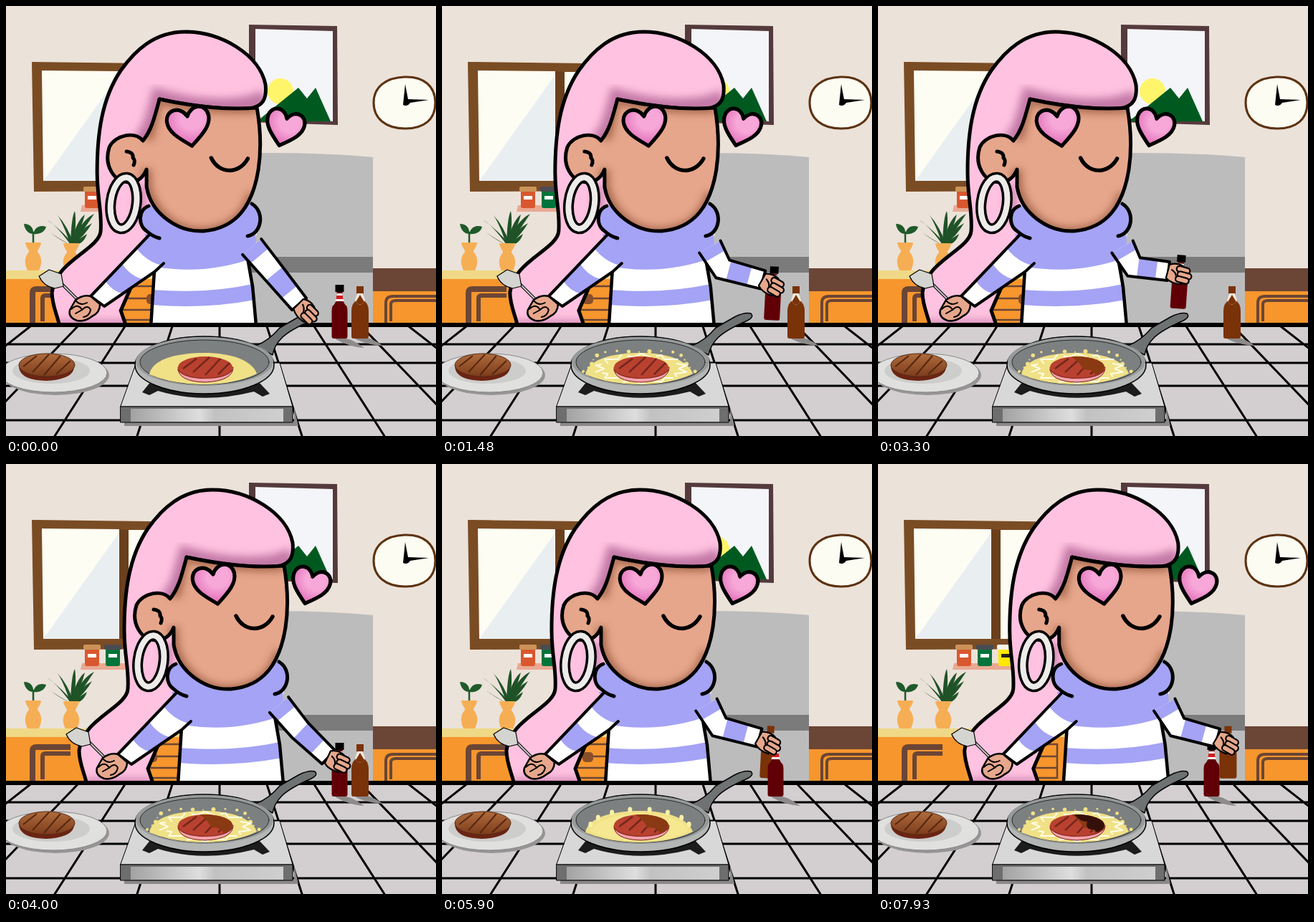
An HTML page that plays this animation: 600x600 px, repeating every 8000 ms.

```html
<!DOCTYPE html>
<html lang="en">
<head>
<meta charset="utf-8">
<title>Cooking</title>
<style>
html,body{margin:0;width:100%;height:100%;overflow:hidden;background:#ebe2d9}
svg{display:block;width:100vw;height:100vh}
.o{stroke:#000;stroke-linejoin:round;stroke-linecap:round}
.l{fill:none;stroke:#000;stroke-linejoin:round;stroke-linecap:round}
</style>
</head>
<body>
<svg viewBox="0 0 600 600">
<defs>
  <filter id="soft" x="-30%" y="-30%" width="160%" height="160%"><feGaussianBlur stdDeviation="6"/></filter>
  <path id="hair" d="M250 36C207 36 180 62 160 90C133 130 127 180 127 232C127 268 134 286 132 314C130 340 68 356 64 400C64 418 72 432 75 448H168L160 425L205 322L230 300L214 130C260 140 310 145 340 143C358 140 364 130 362 110C354 68 300 36 250 36Z"/>
  <path id="face" d="M214 130C206 160 202 174 191 188C180 174 152 180 144 197C136 222 150 246 172 246C184 246 192 238 196 228V252C202 290 240 316 276 314C322 310 344 278 352 228C357 195 354 165 350 142C300 146 250 138 214 130Z"/>
  <path id="heart" d="M0 29C-16 16 -32 4 -31 -12C-30 -29 -9 -33 0 -15C9 -33 30 -29 31 -12C32 4 16 16 0 29Z"/>
  <clipPath id="inHair"><use href="#hair"/></clipPath>
  <clipPath id="inFace"><use href="#face"/></clipPath>
  <clipPath id="inPatty"><ellipse cx="278" cy="504" rx="38" ry="15"/></clipPath>
  <radialGradient id="pink" cx=".6" cy=".3" r=".75"><stop offset=".35" stop-color="#f7a8d8"/><stop offset="1" stop-color="#dd62b2"/></radialGradient>
  <linearGradient id="meat" x2="0" y2="1"><stop offset="0" stop-color="#b06c3c"/><stop offset="1" stop-color="#7c3c1c"/></linearGradient>
  <linearGradient id="panel"><stop offset="0" stop-color="#a2a2a2"/><stop offset=".45" stop-color="#dedede"/><stop offset=".55" stop-color="#c2c2c2"/><stop offset="1" stop-color="#cfcfcf"/></linearGradient>
  <path id="vase" d="M-11 -20H11C10 -12 6 -11 6 -7C12 0 13 8 8 19H-8C-13 8 -12 0 -6 -7C-6 -11 -10 -12 -11 -20Z" fill="#f6ae54"/>
</defs>

<rect width="600" height="600" fill="#ebe2d9"/>
<!-- window -->
<path d="M36 78L285 81V258L39 259Z" fill="#7a4c24"/>
<path d="M50 90L158 91V244L52 244ZM171 92H272V244H171Z" fill="#fdfdf4"/>
<path d="M157 97V244H52ZM268 97V244H180Z" fill="#e9eff1"/>
<path d="M158 91V244H171V92" fill="#6a3f1c"/>
<!-- picture -->
<path d="M339 26L462 28L463 166L339 162Z" fill="#543a3c"/>
<path d="M348 32L456 35V161L348 157Z" fill="#f4f5f8"/>
<circle cx="383" cy="119" r="18" fill="#fff56b"/>
<path d="M350 161L408 114L420 129L432 114L453 161Z" fill="#005a20"/>
<!-- clock -->
<path d="M556 99C583 98 599 112 599 135C599 158 584 171 557 171C530 171 513 157 513 135C513 113 530 100 556 99Z" fill="#fdfcf3" stroke="#5c3210" stroke-width="3"/>
<path d="M557 109L561 130L590 131L564 135Q560 141 554 138Z"/>
<!-- shelf and plants -->
<path d="M106 278H235V287H104Z" fill="#e9a993"/>
<g id="jars"></g>
<path d="M38 331V315" stroke="#1f5a2a" stroke-width="2.5"/>
<path d="M38 318C31 318 26 312 25 304C34 304 39 310 38 318C40 309 47 305 56 308C54 316 46 319 38 318Z" fill="#1f5a2a"/>
<g id="leaves" fill="#1f5227"></g>
<use href="#vase" x="38" y="350"/><use href="#vase" x="91" y="351"/>
<!-- cupboards -->
<rect y="369" width="350" height="13" fill="#efd986"/>
<rect y="381" width="350" height="66" fill="#f7962d"/>
<path d="M37 445V400Q37 395 43 395H90" fill="none" stroke="#6b4535" stroke-width="8"/>
<path d="M51 440V408Q51 404 55 404H90" fill="none" stroke="#6b4535" stroke-width="6"/>
<path d="M150 391H250V438H150M150 408H250M150 424H250" fill="none" stroke="#6b4535" stroke-width="2.5"/>
<rect x="196" y="402" width="15" height="14" rx="5" fill="#8a4f2a"/>
<rect x="505" y="366" width="95" height="32" fill="#6b4535"/>
<rect x="505" y="398" width="95" height="49" fill="#f7962d"/>
<path d="M530 445V414Q530 405 540 405H600M537 440V416Q537 411 544 411H600" fill="none" stroke="#6b4535" stroke-width="4"/>
<!-- fridge -->
<path d="M335 205Q440 204 512 211V446H335Z" fill="#bcbcbc"/>
<path d="M335 350H512V372H335Z" fill="#7b7b7b"/>

<g id="body">
  <use href="#hair" fill="#ffc2e0"/>
  <g clip-path="url(#inHair)">
    <path d="M362 128C330 148 260 142 214 128C204 165 200 180 185 190" fill="none" stroke="#c278a6" stroke-width="24" filter="url(#soft)"/>
    <path d="M70 446H170M188 250V300" stroke="#cf86b2" stroke-width="14" filter="url(#soft)"/>
  </g>
  <use href="#hair" class="l" stroke-width="5"/>
  <!-- jumper -->
  <path d="M204 316L221 358L207 367L202 447H350L337 352L350 318Z" fill="#fff"/>
  <path d="M193 318L210 364Q280 376 350 350L348 314Z" fill="#a4a3f5"/>
  <path d="M204 396Q280 402 344 388L347 410Q280 423 203 417Z" fill="#a4a3f5"/>
  <path class="l" stroke-width="4.5" d="M207 367L202 447M337 352L344 392L349 447"/>
  <!-- spatula arm -->
  <path d="M202 317L118 405L137 419L220 360Z" fill="#fff"/>
  <path d="M202 316L181 337Q195 356 217 362L230 340ZM161 358L138 383Q148 398 162 401L190 381Q172 376 161 358Z" fill="#a4a3f5"/>
  <path class="l" stroke-width="4" d="M201 318L118 405L137 419L207 371L220 359"/>
  <path class="l" stroke-width="4" d="M76 386L104 414"/><path d="M76 386L104 414" stroke="#c9c9c9" stroke-width="2"/>
  <path class="o" d="M46 377L60 368L77 374L80 391L68 394Q52 391 46 377Z" fill="#d4d4d0" stroke-width="1.2"/>
  <path class="o" d="M118 405L131 416Q131 428 120 433Q110 441 99 439Q86 434 89 424L97 410Q108 402 118 405Z" fill="#e6a78c" stroke-width="2.5"/>
  <path class="l" stroke-width="2" d="M97 411Q104 419 113 414M91 423Q100 414 106 424L97 429M106 424Q114 416 118 424Q116 433 108 434"/>
  <!-- collar -->
  <path d="M199 279C184 284 184 306 196 314Q205 322 216 324L336 322C356 316 362 288 343 276Z" fill="#a4a3f5"/>
  <path class="l" stroke-width="5" d="M199 279C184 284 184 306 196 314Q205 322 214 324M343 276C362 288 356 318 337 321"/>
  <!-- head -->
  <use href="#face" fill="#e6a68b"/>
  <g clip-path="url(#inFace)">
    <path d="M196 228V250C204 292 240 318 276 316C312 314 334 294 344 262M210 134L198 186M214 130Q280 146 350 142" fill="none" stroke="#94573c" stroke-width="13" opacity=".85" filter="url(#soft)"/>
  </g>
  <use href="#face" class="l" stroke-width="5"/>
  <path class="l" stroke-width="5" d="M168 203Q178 204 177 212Q181 215 178 222"/>
  <g transform="rotate(7 164 275)" fill="none">
    <ellipse cx="164" cy="275" rx="18" ry="36" stroke="#000" stroke-width="15"/>
    <ellipse cx="164" cy="275" rx="18" ry="36" stroke="#eeecea" stroke-width="8"/>
  </g>
  <g id="look">
    <use href="#heart" class="o" fill="url(#pink)" stroke-width="5.4" transform="translate(255 168) rotate(-9) scale(.95)"/>
    <use href="#heart" class="o" fill="url(#pink)" stroke-width="6" transform="translate(388 170) rotate(16) scale(.85 .88)"/>
  </g>
  <path id="smile" class="l" stroke-width="5.5" d="M286 212C297 235 325 235 337 213"/>
</g>

<!-- worktop -->
<rect y="445" width="600" height="155" fill="#d3cfd0"/>
<g id="tiles" class="l" stroke-width="3"></g>
<rect y="442" width="600" height="6"/>
<!-- plate -->
<ellipse cx="69" cy="515" rx="75" ry="28" fill="#969494"/>
<ellipse cx="66" cy="512" rx="75" ry="27" fill="#e0e0de" stroke="#888" stroke-width="1"/>
<ellipse cx="63" cy="509" rx="54" ry="18" fill="#cdcdcb"/>
<path d="M18 500Q16 522 56 523Q96 521 95 502Z" fill="#6b2413"/>
<ellipse cx="57" cy="501" rx="39" ry="16" fill="url(#meat)" stroke="#5a2b14" stroke-width="1"/>
<path d="M24 503L43 488M37 511L60 486M53 515L76 488M70 514L90 495" stroke="#54260f" stroke-width="2"/>
<!-- stove -->
<path d="M165 580H402V560L408 586H165Z" fill="#8b8888"/>
<path class="o" d="M182 498H382L400 559H160Z" fill="#d9d8d8" stroke-width="1"/>
<path class="o" d="M160 559H400V581H160Z" fill="#6e6e6e" stroke-width="1"/>
<path d="M174 562H387V580H174Z" fill="url(#panel)"/>
<path d="M202 524H352L368 541L358 545L346 538Q275 556 212 537L200 543L190 539Z" fill="#1c1c1c"/>
<!-- pan -->
<path class="o" d="M348 474Q366 468 382 449L408 434Q422 427 431 429Q436 434 426 439Q396 452 385 463Q374 474 372 487Z" fill="#6f7272" stroke-width="1.5"/>
<ellipse class="o" cx="277" cy="501" rx="97" ry="40" fill="#b4b5b5" stroke-width="1.5"/>
<ellipse cx="277" cy="496" rx="96" ry="34" fill="#979a9a"/>
<ellipse class="o" cx="277" cy="497" rx="90" ry="31" fill="#7d8080" stroke-width=".7"/>
<path d="M200 514C204 492 240 484 276 484C318 484 344 496 350 513Q318 528 277 528Q232 528 200 514Z" fill="#f0e187"/>
<g id="fizz"></g>
<path d="M240 504Q239 524 278 525Q317 523 317 504Z" fill="#f2a3ac" stroke="#7b1d1c" stroke-width="1"/>
<path d="M240 507Q248 519 278 519Q308 519 316 507" fill="none" stroke="#8f2a22" stroke-width="2"/>
<ellipse cx="278" cy="504" rx="38" ry="15" fill="#b9412f"/>
<g clip-path="url(#inPatty)">
  <path d="M247 506L266 492M261 511L284 490M278 515L300 491M296 514L312 498" stroke="#74261c" stroke-width="2.5"/>
  <path id="glaze1" d="M266 486Q284 498 286 508Q300 504 306 520L325 500L300 484Z" fill="#8a3a12"/>
  <path id="glaze2" d="M272 486Q280 499 292 499Q288 511 302 510Q306 518 320 512V484Z" fill="#35100a"/>
</g>

<!-- bottles, gripped at their own origin -->
<g fill="#8d8a8a">
  <path id="shade2" d="M488 460Q506 460 526 474Q508 474 488 465Z"/>
  <path id="shade1" d="M460 461Q480 462 500 477Q480 476 460 465Z"/>
</g>
<g id="brown">
  <path d="M-5 -25H5V-16L4 -12Q5 -5 10 0Q12 4 12 10V45Q12 48 9 48H-9Q-12 48 -12 45V10Q-12 4 -10 0Q-5 -5 -4 -12L-5 -16Z" fill="#7a3208"/>
  <path d="M-4 -15H4L7 -5Q0 6 -7 -5Z" fill="#f4e8dc"/><path d="M0 -13L6 -3Q0 4 -6 -3Z" fill="#7a3208"/>
</g>
<g id="red">
  <path d="M-4 -17H4V-8Q6 0 10 3Q11 6 11 10V45Q11 48 8 48H-8Q-11 48 -11 45V10Q-11 6 -10 3Q-6 0 -4 -8Z" fill="#600006"/>
  <path d="M-4 -15H4V-12H-4ZM-5 -7H5L6 -4H-6Z" fill="#fff"/><path d="M-4 -12H4L5 -7H-5Z" fill="#d31c1c"/>
  <rect x="-6" y="-27" width="12" height="10"/>
  <path id="drip" d="M-3 -27L-2 -33L4 -32L3 -27Z" fill="#c87840"/>
</g>
<g id="arm">
  <path id="sleeve" fill="#fff"/><path id="band1" fill="#a4a3f5"/><path id="band2" fill="#a4a3f5"/>
  <path id="seam" class="l" stroke-width="4"/>
  <g id="hand" class="o" fill="#e6a78c" stroke-width="2.2">
    <path d="M-1 -9Q8 -15 18 -12L26 -6L22 13Q8 16 -1 10Z"/>
    <rect x="10" y="-11" width="19" height="8" rx="4"/>
    <rect x="13" y="-4" width="20" height="8" rx="4"/>
    <rect x="12" y="3" width="19" height="8" rx="4"/>
    <path d="M4 -3Q10 -1 12 4" fill="none"/>
  </g>
</g>
</svg>
<script>
const LOOP = 8000, STEP = 70.2;
const SECOND = 4220; // the brown bottle repeats the red one's moves this much later
const $ = id => document.getElementById(id);
const set = (id, name, v) => $(id).setAttribute(name, v);
const show = (id, on) => set(id, 'visibility', on ? 'visible' : 'hidden');
const clamp = v => Math.max(0, Math.min(1, v));

// static repeats
$('jars').innerHTML = [['#d9572f', '#cc9358', '#fff'], ['#00743a', '#4a4b52', '#fff'], ['#ffe800', '#f7f4ea', '#222']]
  .map(([c, lid, tag], i) => `<g transform="translate(${120 + i * 29} 0)">
  <rect x="-10" y="257" width="20" height="25" rx="3" fill="${c}"/><rect x="-12" y="252" width="24" height="7" rx="2" fill="${lid}"/>
  <rect x="-6" y="265" width="12" height="5" fill="${tag}"/></g>`).join('');
$('leaves').innerHTML = [[57, 298], [62, 316], [71, 291], [80, 303], [96, 286], [110, 291], [123, 290], [120, 303], [113, 318]]
  .map(([x, y]) => { const m = (x + 92) / 2; return `<path d="M90 333Q${m - 3} ${y + 9} ${x} ${y}Q${m + 5} ${y + 16} 94 333Z"/>`; }).join('');
let grid = 'M0 472H600M0 498H600M0 530H600M0 578H600';
for (let n = -6; n <= 6; n++) grid += `M${298 + n * 66} 447L${298 + n * 115} 600`;
$('tiles').innerHTML = `<path d="${grid}"/>`;

// oil: drops along the back of the pool and a white wavy ring
let drops = '', ring = '', pops = '';
for (let i = 0; i <= 16; i++) {
  const a = Math.PI * (1 + i / 16), r = 1 + .09 * Math.sin(i * 5.3);
  drops += `<circle cx="${275 + 78 * Math.cos(a) * r}" cy="${510 + 30 * Math.sin(a) * r}" r="${2 + Math.sin(i * 3.7)}"/>`;
  if (i % 2) pops += `<ellipse cx="${276 + 70 * Math.cos(a)}" cy="${508 + 26 * Math.sin(a)}" rx="3" ry="4"/>`;
}
for (let i = 0; i <= 28; i++) {
  const a = i / 28 * 2 * Math.PI, r = i % 2 ? 1.1 : .88;
  ring += `${i ? 'L' : 'M'}${278 + 59 * r * Math.cos(a)} ${506 + 19 * r * Math.sin(a)}`;
}
$('fizz').innerHTML = `<g id="boil"><g fill="#f0e187">${drops}</g><path d="${ring}" fill="none" stroke="#fffde8" stroke-width="2" stroke-linejoin="round" stroke-dasharray="34 8"/></g>
<g id="pops" fill="#f8efa8"><path d="M206 512Q222 489 276 488Q332 489 345 511Q320 526 277 526Q232 526 206 512Z" fill="#f5e890"/>${pops}</g>`;

// monotone curve through [time, value] keys
function curve(keys, t) {
  let i = 0;
  while (i < keys.length - 2 && t >= keys[i + 1][0]) i++;
  const slope = j => (keys[j + 1][1] - keys[j][1]) / (keys[j + 1][0] - keys[j][0]);
  const tan = j => {
    if (j < 1 || j > keys.length - 2) return 0;
    const a = slope(j - 1), b = slope(j);
    return a * b > 0 ? 2 * a * b / (a + b) : 0;
  };
  const [t0, a] = keys[i], [t1, b] = keys[i + 1], h = t1 - t0, u = clamp((t - t0) / h), v = 1 - u;
  return a * v * v * (1 + 2 * u) + b * u * u * (3 - 2 * u) + h * u * v * (tan(i) * v - tan(i + 1) * u);
}

// she leans right to a bottle, back left to pour, and right again to put it down
const lean = [
  [-70, -2], [430, 38], [1280, 38], [2000, -2], [3300, -2], [3820, 38], [4150, 38],
  [4650, 64], [5500, 64], [6220, -2], [7520, -2], [8040, 64]
];

// ms, elbow x y, wrist x y, hand angle, bottle angle (relative to the body)
const reach = [372, 371, 412, 409, 25, 0], lifted = [361, 367, 417, 382, 30, 3], pour = [354, 364, 329, 399, 90, -88];
const serve = [
  [480, ...reach], [560, ...reach], [630, 365, 366, 414, 398, 18, 0], [1000, ...lifted], [1680, ...lifted],
  [2120, ...pour], [2900, ...pour], [3290, 359, 364, 407, 370, 15, 4], [3710, ...lifted.slice(0, 5), 0],
  [3900, ...reach], [4080, ...reach]
];
const poses = [
  [0, 377, 377, 409, 416, 45, 0], ...serve, [4400, 366, 368, 410, 396, 25, 0],
  ...serve.map(([t, ...p]) => [t + SECOND, ...p])
];
const pose = t => [1, 2, 3, 4, 5, 6].map(c => curve(poses.map(p => [p[0], p[c]]), t));
const held = t => t >= 545 && t < 3900;

function drawArm(S, E, W) {
  const l1 = Math.hypot(E[0] - S[0], E[1] - S[1]), l2 = Math.hypot(W[0] - E[0], W[1] - E[1]), mid = l1 / (l1 + l2);
  const n1 = [(E[1] - S[1]) / l1, (S[0] - E[0]) / l1], n2 = [(W[1] - E[1]) / l2, (E[0] - W[0]) / l2];
  const edge = (u, side) => {
    const first = u < mid, f = first ? u / mid : (u - mid) / (1 - mid), [A, B] = first ? [S, E] : [E, W];
    let n = first ? n1 : n2;
    if (Math.abs(u - mid) < 1e-6) {
      const m = [n1[0] + n2[0], n1[1] + n2[1]], d = Math.hypot(...m);
      n = [m[0] / d, m[1] / d];
    }
    const w = side * (17 - 4 * u);
    return [0, 1].map(i => (A[i] + (B[i] - A[i]) * f + n[i] * w).toFixed(1)).join(' ');
  };
  const band = (a, b) => {
    const us = a < mid && mid < b ? [a, mid, b] : [a, b];
    return 'M' + [...us.map(u => edge(u, 1)), ...us.reverse().map(u => edge(u, -1))].join('L');
  };
  set('sleeve', 'd', band(0, 1) + 'Z');
  set('band1', 'd', band(0, .16) + 'Z');
  set('band2', 'd', band(.47, .79) + 'Z');
  set('seam', 'd', band(0, 1));
}

function draw(now) {
  const k = Math.floor((now + 5) / STEP), t = k * STEP;
  const x = curve(lean, t), turn = .3 * Math.max(0, curve(lean, t + 120) - x) - 3;
  set('body', 'transform', `translate(${x} 0)`);
  set('look', 'transform', `translate(${turn * .6} 0)`);
  set('smile', 'transform', `translate(${turn} 0)`);

  const [ex, ey, wx, wy, a, b] = pose(t), r = a * Math.PI / 180;
  drawArm([343, 336], [ex, ey], [wx, wy]);
  set('arm', 'transform', `translate(${x} 0)`);
  set('hand', 'transform', `translate(${wx} ${wy}) rotate(${a})`);

  const grip = `translate(${x + wx + 17 * Math.cos(r)} ${wy + 17 * Math.sin(r)}) rotate(${b})`;
  const redUp = held(t), brownUp = held(t - SECOND);
  set('red', 'transform', redUp ? grip : 'translate(465.5 416)');
  set('brown', 'transform', brownUp ? grip : 'translate(494 416)');
  show('shade1', !redUp);
  show('shade2', !brownUp);
  show('drip', redUp && b < -60);

  set('glaze1', 'opacity', clamp((t - 2450) / 400));
  set('glaze2', 'opacity', clamp((t - SECOND - 2450) / 400));
  const beat = k % 12;
  show('boil', beat > 1);
  show('pops', beat < 2 && k > 0);
}

function frame() {
  draw(performance.now() % LOOP);
  requestAnimationFrame(frame);
}
frame();
</script>
</body>
</html>
```
